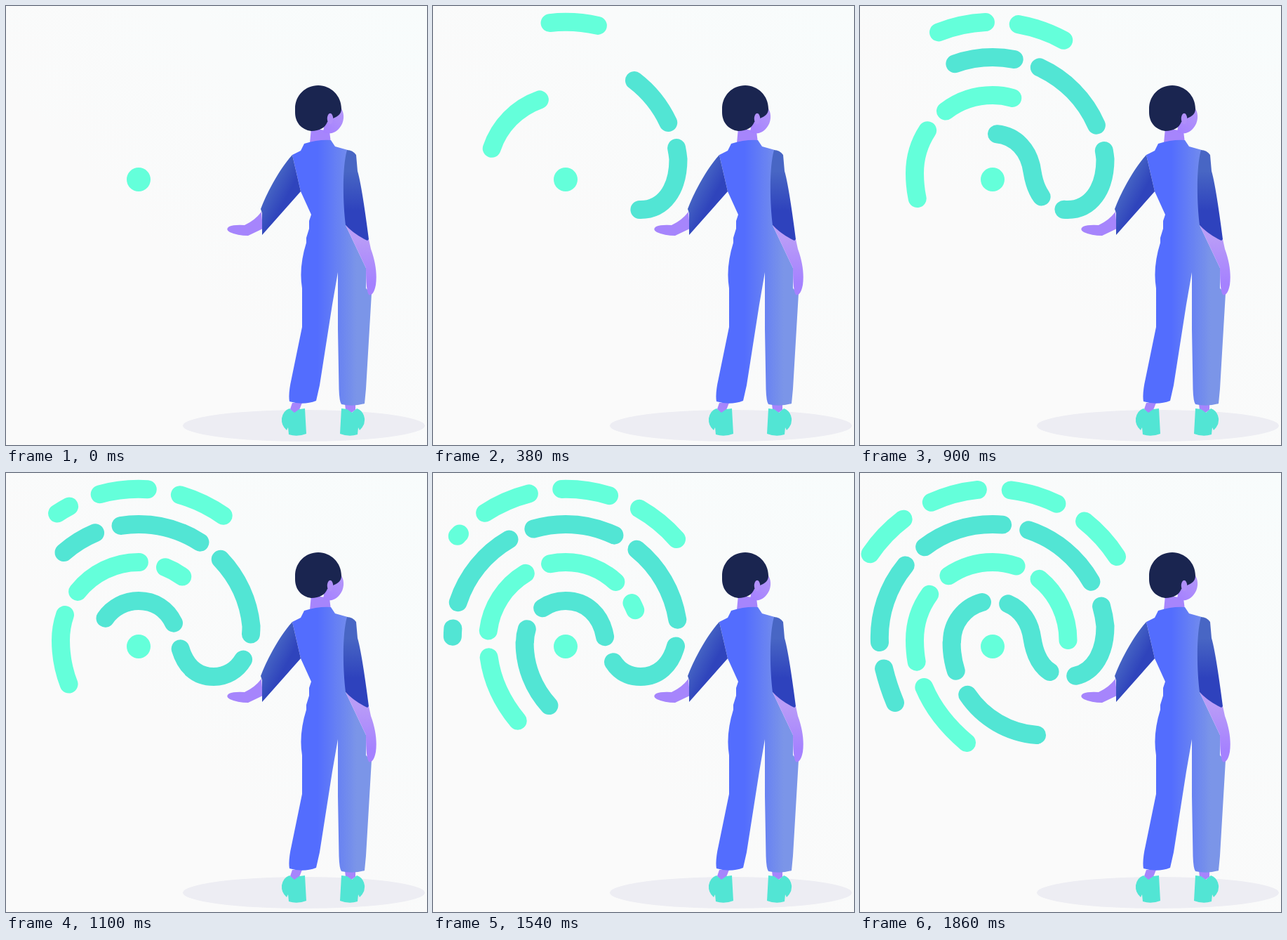
These frames come from a looping animation (600x625 px, 1.94 s). An HTML page:

```html
<!DOCTYPE html>
<html lang="en">
<head>
<meta charset="utf-8">
<title>Fingerprint</title>
<style>
html, body { margin: 0; width: 100%; height: 100%; overflow: hidden; background: #fafafa; }
svg { display: block; width: 600px; height: 625px; }
.ridge { fill: none; stroke-width: 26; stroke-linecap: round; }
.light { stroke: #64ffda; }
.teal { stroke: #52e5d4; }
</style>
</head>
<body>
<svg viewBox="0 0 600 625">
  <defs>
    <linearGradient id="sky" x1="0" y1="1" x2="1" y2="0">
      <stop offset=".4" stop-color="#fafafa"/><stop offset="1" stop-color="#f8fcfc"/>
    </linearGradient>
    <linearGradient id="suit" gradientUnits="userSpaceOnUse" x1="444" y1="0" x2="500" y2="0">
      <stop stop-color="#536dfe"/><stop offset="1" stop-color="#7b95e8"/>
    </linearGradient>
    <linearGradient id="sleeveL" gradientUnits="userSpaceOnUse" x1="372" y1="262" x2="398" y2="276">
      <stop stop-color="#4766c4"/><stop offset="1" stop-color="#2f44bc"/>
    </linearGradient>
    <linearGradient id="sleeveR" gradientUnits="userSpaceOnUse" x1="0" y1="235" x2="0" y2="292">
      <stop stop-color="#4866c4"/><stop offset="1" stop-color="#2e42bd"/>
    </linearGradient>
    <linearGradient id="arm" gradientUnits="userSpaceOnUse" x1="0" y1="330" x2="0" y2="395">
      <stop stop-color="#b99cf7"/><stop offset="1" stop-color="#a581ff"/>
    </linearGradient>
    <linearGradient id="face" gradientUnits="userSpaceOnUse" x1="455" y1="180" x2="482" y2="150">
      <stop stop-color="#a581ff"/><stop offset="1" stop-color="#b497f9"/>
    </linearGradient>
    <path id="shoe" fill="#52e5d4" d="M404 573L411 579 418 574 426 573 428 609Q415 614 403 610L402 600 400 604Q392 597 393 587 395 576 404 573Z"/>
  </defs>
  <rect width="600" height="625" fill="url(#sky)"/>
  <ellipse cx="424.5" cy="597.5" rx="172.5" ry="22.5" fill="#ededf3"/>

  <g fill="#a685fc">
    <path d="M408 565H422L418 575 411 580 405 574Z"/>
    <path d="M483 566H498L498 575 491 580 484 575Z"/>
    <path d="M435 174L433 195H463L461 178Z"/>
    <path d="M364 293Q355 305 340 312 325 311 318 314 312 318 319 322 330 327 345 327L366 317Z"/>
  </g>
  <use href="#shoe"/>
  <use href="#shoe" transform="matrix(-1 0 0 1 904 0)"/>

  <path fill="url(#face)" d="M478 146C483 154 482 166 475 174 469 181 462 183 452 180L456 150Z"/>
  <path fill="#1a2550" d="M412 146C412 127 427 113 445 113S478 128 478 146C478 153 474 157 466 160L458 165C455 173 447 178 435 178 421 176 412 166 412 151Z"/>
  <ellipse cx="462" cy="160.500" rx="4.200" ry="7.800" fill="#b08ffa"/>

  <path fill="url(#suit)" d="M425 196Q444 190 463 191L469 200 487 205 484 312 513 373V402L521 409 513 545 511 566Q495 571 478 567 475 563 474.500 545L473 460V379L465 425 447 540 442 562Q424 569 404 563 402 552 407 530L422 457V402Q417 372 428 337V330L432 317V306L435 297 420 264 408 212 420 206Z"/>
  <path fill="url(#sleeveL)" d="M408 212L420 264 365 326 365 295 363 289C372 265 390 232 408 212Z"/>
  <path fill="url(#arm)" d="M484 312L517 332 520 346C527 365 529 382 527 397 525 408 521 413 517 411 514 406 513 394 513 373Z"/>
  <path fill="url(#sleeveR)" d="M486 205Q494 205 499 212L501 235Q507 255 517 332L515 334Q496 325 484 312C480 280 479 230 486 205Z"/>

  <circle cx="189" cy="247" r="17" fill="#64ffda"/>
  <path id="outer" class="ridge light" d="M366 119A211 211 0 0 0 12 119"/>
  <path id="swirl" class="ridge teal" d="M252 373A131.400 131.400 0 0 1 130.600 242L131 240A58 58 0 0 1 189 182C219 182 241 203 245.500 236 250.500 268 266 290 296 290 328 290 349.500 262 349.500 218A161 161 0 0 0 189 73 161 161 0 0 0 34 278Q40 303 50 327"/>
  <path id="inner" class="ridge light" d="M152 384C107 346 78 298 78 238A111 111 0 0 1 189 127 107.500 111 0 0 1 296.500 238"/>
</svg>
<script>
const LOOP = 1940, GROW = 1860, STEP = 20;

function ridge(id, dash, gap, mid, half) {
  const el = document.getElementById(id);
  const len = el.getTotalLength();
  return { el, len, dash, gap, mid: mid || len / 2, half: half || len / 2 };
}

const ridges = [
  ridge("outer", 68.6, 46.9, 207, 212),
  ridge("swirl", 118, 38),
  ridge("inner", 100.5, 38)
];

// Reveals a ridge from its middle; the dashes ride on the moving start.
function reveal({ el, len, dash, gap, mid, half }, p) {
  const start = Math.max(0, mid - half * p);
  const end = Math.min(len, mid + half * p);
  const parts = [];
  for (let s = start; s < end; s += dash + gap) {
    parts.push(Math.min(dash, end - s), gap);
  }
  el.style.visibility = parts.length ? "visible" : "hidden";
  if (!parts.length) return;
  parts[parts.length - 1] = 9999;
  el.setAttribute("stroke-dasharray", parts.join(" "));
  el.setAttribute("stroke-dashoffset", -start);
}

function draw() {
  const t = Math.floor(performance.now() % LOOP / STEP) * STEP;
  const p = Math.min(1, t / GROW);
  ridges.forEach(r => reveal(r, p));
  requestAnimationFrame(draw);
}
draw();
</script>
</body>
</html>
```
